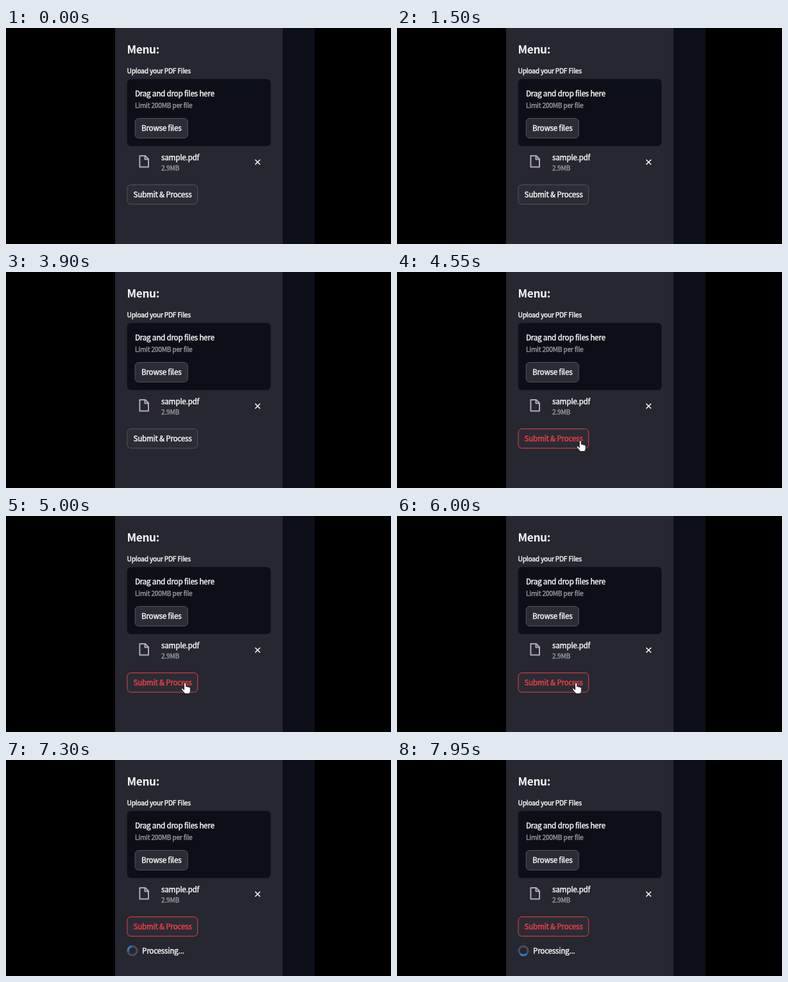
An HTML page that plays this animation: 600 px wide and 338 px high, repeating every 8 s.

```html
<!DOCTYPE html>
<html lang="en">
<head>
<meta charset="utf-8">
<title>PDF upload menu</title>
<style>
  html, body { margin: 0; width: 100%; height: 100%; overflow: hidden; background: #000; }
  svg { display: block; width: 100vw; height: 100vh; }
  text {
    font: 400 11.7px "Noto Sans CJK SC", "Noto Sans CJK JP", "Noto Sans", sans-serif;
    letter-spacing: -.021em; fill: #fafafa; stroke: #fafafa; stroke-width: .4px;
  }
  .title { font-size: 17.2px; font-weight: 700; stroke: none; }
  .small { font-size: 10.2px; }
  .muted { fill: #97979c; stroke: #97979c; }
  .button { fill: #2b2c36; stroke: #53545d; }
  .active .button { stroke: #e84047; }
  .active text { fill: #f33f43; stroke: #f33f43; }
</style>
</head>
<body>
<svg viewBox="0 0 600 338">
  <rect x="170" width="261" height="338" fill="#262730"/>
  <rect x="431" width="50" height="338" fill="#0c0f17"/>
  <text class="title" x="188.5" y="40.2">Menu:</text>
  <text class="small" x="188.5" y="71.3">Upload your PDF Files</text>
  <rect x="188.7" y="79.7" width="223.8" height="105.1" rx="6" fill="#0c0f17"/>
  <text x="201" y="106.5">Drag and drop files here</text>
  <text class="small muted" x="201" y="125">Limit 200MB per file</text>
  <rect class="button" x="201.2" y="141.5" width="82" height="30.7" rx="5.5"/>
  <text x="211" y="161">Browse files</text>

  <path d="M208.4 200H217L222 205V217.4H208.4ZM216.5 200V205.5H222" fill="none" stroke="#b1a9bd" stroke-width="2" stroke-linejoin="round"/>
  <text x="242" y="206.8">sample.pdf</text>
  <text class="small muted" x="242" y="223">2.9MB</text>
  <path d="M388.3 206L396 213.7M396 206L388.3 213.7" stroke="#fafafa" stroke-width="1.6"/>

  <g id="submit">
    <rect class="button" x="189" y="245.4" width="109.7" height="30.4" rx="5.5"/>
    <text x="198.5" y="265.3">Submit &amp; Process</text>
  </g>

  <g id="progress">
    <g fill="none" stroke-width="3">
      <circle cx="197" cy="298.5" r="7" stroke="#4b4e58"/>
      <path id="arc" d="M192.05 293.55A7 7 0 0 1 201.95 293.55" stroke="#2680d0"/>
    </g>
    <text x="212" y="302.5">Processing...</text>
  </g>

  <g id="pointer" fill="#fff" stroke="#000" stroke-width=".8" stroke-linejoin="round">
    <path id="arrow" d="M0 0V14L3.3 11L5.5 16L7.8 15L5.6 10.2H10Z"/>
    <path id="hand" d="M-1.5 1.5Q-1.5 0 0 0T1.5 1.5V6Q3 5 4 6.5Q5.5 5.7 6.5 7Q8.5 6.5 8.5 9V12Q8.5 15 6.5 17H0L-5 11Q-6.3 9-4.7 8.5Q-3.5 8.3-1.5 11Z"/>
  </g>
</svg>
<script>
  const LOOP = 8000, ENTER = 4200, ARRIVE = 4600, CLICKED = 6400, LEAVE = 6850, GONE = 7000;
  const byId = id => document.getElementById(id);
  const show = (id, visible) => byId(id).style.display = visible ? "" : "none";
  const ease = (t, from, to) => {
    const p = Math.min(1, Math.max(0, (t - from) / (to - from)));
    return p * p * (3 - 2 * p);
  };

  function draw(t) {
    const arrive = ease(t, ENTER, ARRIVE), leave = ease(t, LEAVE, GONE);
    const x = 440 - 161 * arrive + 24 * leave;
    const y = 328 - 67 * arrive + 49 * leave;
    const overButton = x < 299 && y < 276;
    byId("pointer").setAttribute("transform", `translate(${x} ${y})`);
    show("pointer", t >= ENTER && t < GONE);
    show("hand", overButton);
    show("arrow", !overButton);
    // The button keeps its focus colour after the click.
    byId("submit").classList.toggle("active", overButton || t >= CLICKED);
    show("progress", t >= CLICKED);
    byId("arc").setAttribute("transform", `rotate(${(t - 7950) * .36 + 180} 197 298.5)`);
  }

  function frame(now) {
    draw(now % LOOP);
    requestAnimationFrame(frame);
  }
  draw(0);
  requestAnimationFrame(frame);
</script>
</body>
</html>
```
